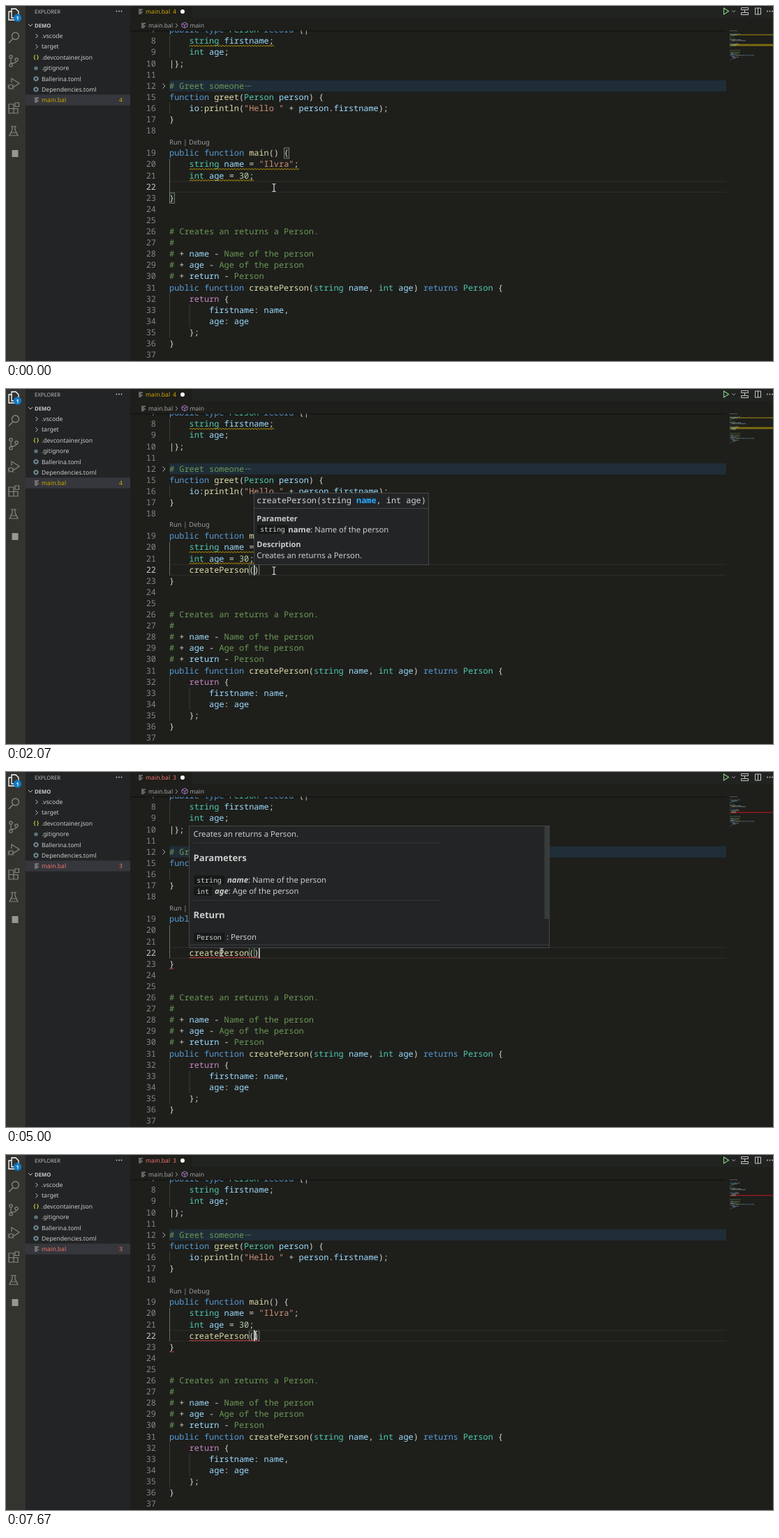
An HTML page that plays this animation: 1099x510 px, repeating every 8 s.

```html
<!DOCTYPE html>
<html lang="en">
<head>
<meta charset="utf-8">
<title>Editor demo</title>
<style>
html, body { margin: 0; width: 100%; height: 100%; overflow: hidden; background: #1e1e1b; }
svg { display: block; }
text { white-space: pre; text-rendering: geometricPrecision; font-family: "Noto Sans", "Open Sans", sans-serif; }
.mono { font-family: "Noto Sans Mono", "DejaVu Sans Mono", monospace; }
.bold { font-weight: 700; }
.ital { font-style: italic; }
.status { fill: #cca700; }
.err .status { fill: #f2736a; }
.on-err, .err .on-warn { display: none; }
.err .on-err { display: inline; }
</style>
</head>
<body>
<svg id="stage" width="1099" height="510" viewBox="0 0 1099 510"></svg>
<script>
(() => {
const CW = 7.14, LH = 16.1, X0 = 234, CODE = 11.9, UI = 11.3, SMALL = 8.65;
const FG = '#d4d4d4', PANEL = '#222425', EDGE = '#454747', HIT = '#2aaaff';
const el = id => document.getElementById(id);
const stage = el('stage');
const col = n => X0 + n * CW;

const text = (x, y, s, fill = '#cccccc', size = UI, cls = '', more = '') =>
  `<text x="${x}" y="${y}" fill="${fill}" font-size="${size}" class="${cls}" ${more}>${s}</text>`;
const mono = (x, y, s, fill = FG, size = CODE, cls = '', more = '') =>
  text(x, y, s, fill, size, 'mono ' + cls, more);
const rect = (x, y, w, h, fill, more = '') =>
  `<rect x="${x}" y="${y}" width="${w}" height="${h}" fill="${fill}" ${more}/>`;
const path = (d, stroke, w = 1) =>
  `<path d="${d}" fill="none" stroke="${stroke}" stroke-width="${w}"/>`;
const ring = (x, y, r, stroke, w = 1.2, more = '') =>
  `<circle cx="${x}" cy="${y}" r="${r}" fill="none" stroke="${stroke}" stroke-width="${w}" ${more}/>`;
const dot = (x, y, r, fill) => `<circle cx="${x}" cy="${y}" r="${r}" fill="${fill}"/>`;
const group = (id, s) => `<g id="${id}">${s}</g>`;
const only = (state, s) => `<g class="on-${state}">${s}</g>`;
const span = (s, fill, cls = '') => `<tspan fill="${fill}" class="${cls}">${s}</tspan>`;

// Code listing; @ marks the code lens row
const source = `public type Person record {|
    string firstname;
    int age;
|};

# Greet someone
function greet(Person person) {
    io:println("Hello " + person.firstname);
}

@
public function main() {
    string name = "Ilvra";
    int age = 30;

}


# Creates an returns a Person.
#
# + name - Name of the person
# + age - Age of the person
# + return - Person
public function createPerson(string name, int age) returns Person {
    return {
        firstname: name,
        age: age
    };
}
`.split('\n');
const rowTop = i => 251.6 + (i - 14) * LH;

const GREEN = '#6a9955', VAR = '#9cdcfe', FUNC = '#dcdcaa';
const colors = ['#ce9178', '#569cd6', '#c586c0', '#4ec9b0', FUNC, '#b5cea8', VAR, FG];
const rule = /(".*?")|\b(public|function|type|record|returns)\b|\b(return)\b|\b(string|int|Person)\b|(\w+)(?=\()|(\d+)|(\w+)|([^\w"]+)/g;

function tokens(s) {
  const doc = s.match(/^(# )(\+ )(\w+)( - )(.*)$/);
  if (doc) return doc.slice(1).map((p, i) => [p, [GREEN, FG, VAR, FG, GREEN][i]]);
  if (s[0] === '#') return [[s, GREEN]];
  return [...s.matchAll(rule)].map(m => [m[0], colors[m.slice(1).findIndex(Boolean)]]);
}

function wave(c, n, row, color) {
  const steps = Math.round(n * CW / 2.1);
  const zigzag = Array.from({ length: steps }, (_, i) => `l2.1 ${i % 2 ? 1.7 : -1.7}`).join('');
  return path(`M${col(c)} ${rowTop(row) + 15.8}${zigzag}`, color, 0.9);
}
const waves = (list, color) => list.map(w => wave(...w, color)).join('');
const guide = (c, r1, r2, color) =>
  path(`M${col(c) + 0.5} ${rowTop(r1)}V${rowTop(r2 + 1)}`, color);

function listing() {
  let out = rect(X0, rowTop(5), 798, LH, '#1f2d37')
    + path('M234 252H1032M234 267.4H1032', '#2d2d2a')
    + guide(0, 1, 2, '#3c3c3a') + guide(0, 7, 7, '#3c3c3a') + guide(0, 12, 14, '#6b6b68')
    + guide(0, 24, 27, '#3c3c3a') + guide(4, 25, 26, '#3c3c3a');
  let num = 7, map = '', my = 39.6;
  source.forEach((s, i) => {
    const y = rowTop(i) + 12;
    if (s === '@') {
      out += text(X0, y - 0.5, 'Run | Debug', '#999999', 9.55, '', 'id="lens"');
      return;
    }
    out += mono(215, y, num, num === 22 ? '#c6c6c6' : '#858585', CODE, '', 'text-anchor="end"');
    const code = s.trimStart(), pad = s.length - code.length, parts = tokens(code);
    if (code) out += mono(col(pad), y, parts.map(p => span(...p)).join(''));
    let c = pad;
    for (const [p, fill] of parts) {
      if (p.trim()) map += rect(1037 + c * 0.52, my, p.trimEnd().length * 0.52, 0.9, fill, 'opacity=".55"');
      c += p.length;
    }
    my += 1.4;
    num += num === 12 ? 3 : 1;
  });
  out += path('M224.5 111.5l3.5 3.5l-3.5 3.5', '#b0b0b0') + [344, 347, 350].map(x => dot(x, 115, 0.8, '#8a8a8a')).join('')
    + only('warn', waves([[4, 17, 1], [4, 22, 12], [4, 13, 13]], '#cca700'))
    + only('err', waves([[4, 14, 14], [0, 1, 15]], '#f14c4c'));
  return out + only('warn', [41, 55, 56.4].map(y => rect(1037, y - 0.3, 62, 1.4, '#83720f')).join(''))
    + only('err', rect(1037, 57.4, 62, 1.3, '#a3191f'))
    + rect(1037, 35.2, 11, 0.9, '#8a9a8a', 'opacity=".55"') + map
    + rect(1039, 57.6, 0, 0.9, FUNC, 'opacity=".55" id="mapTyped"');
}

// Surrounding window
const bars = (x, y) => path(`M${x} ${y - 3}h6M${x} ${y - 1}h4M${x} ${y + 1}h6M${x} ${y + 3}h4`, '#b8b8b8', 0.9);
const dots = (x, y) => [-3.5, 0, 3.5].map(d => dot(x + d, y, 0.9, '#c5c5c5')).join('');
const chevron = (x, y) => path(`M${x} ${y - 3}l3 3l-3 3`, '#c5c5c5');
const gear = y => ring(43, y, 2.4, '#7f9aa5', 1.3) + ring(43, y, 3.6, '#7f9aa5', 1, 'stroke-dasharray="1.4 1.4"');
const cube = (x, y, r, c) =>
  path(`M${x} ${y - r}l${r} ${r / 2}v${r}l${-r} ${r / 2}l${-r} ${-r / 2}v${-r}zM${x - r} ${y - r / 2}l${r} ${r / 2}l${r} ${-r / 2}M${x} ${y}v${r}`, c, 0.9);
const count = (x, y) => only('warn', text(x, y, 4, '', SMALL, 'status')) + only('err', text(x, y, 3, '', SMALL, 'status'));

function sidebar() {
  const g = '#878783', w = 1.2;
  let out = rect(0, 0, 28, 510, '#333330') + rect(28, 0, 150, 510, PANEL)
    + path('M8 4h6l4 4v9h-10zM8 8h-4v12h9v-3', '#ffffff', 1.3)
    + dot(16.5, 17, 5.7, '#0e7ac4') + text(16.5, 19.7, '1', '#fff', 7.2, 'bold', 'text-anchor="middle"')
    + ring(13.5, 43, 5, g, 1.3) + path('M10 47l-6 6', g, 1.4)
    + ring(7, 73, 2.2, g) + ring(7, 85, 2.2, g) + ring(15, 77, 2.2, g) + path('M7 75.5v7M15 79.3q0 3-8 3', g, w)
    + path('M8 110v-6l11 7l-8 5.5', g, w) + ring(7, 116, 3, g)
    + path('M2.5 113l2 1.5M2 116.5h2M2.5 120l2-1.5M11.5 113l-2 1.5M12 116.5h-2M11.5 120l-2-1.5', g, 0.9)
    + path('M4 141h7v13h-7zM4 147.5h13v6.5h-6M13 139h5.5v5.5h-5.5z', g, w)
    + path('M7 173h8M9 173v5l-4 8h12l-4-8v-5M7 182h8', g, w)
    + rect(8.5, 207, 9, 10, '#969692')
    + text(41, 10.5, 'EXPLORER', '#bbbbbb', 7.7) + dots(162, 7.5)
    + path('M32 26l3 3l3-3', '#c5c5c5') + text(41, 30.8, 'DEMO', '#cccccc', 7.7, 'bold')
    + rect(28, 127.3, 150, 15.4, '#36373c');
  const files = ['.vscode', 'target', '.devcontainer.json', '.gitignore', 'Ballerina.toml', 'Dependencies.toml', 'main.bal'];
  files.forEach((f, i) => { out += text(51, 46.1 + i * 15.35, f, '#cccccc', SMALL, i < 6 ? '' : 'status'); });
  return out + chevron(42.5, 43) + chevron(42.5, 58.4) + mono(38.5, 76.4, '{}', '#cbcb41', 8, 'bold')
    + dot(43, 89.5, 2.8, '#5d7079') + gear(104.5) + gear(119.8) + bars(41, 135) + count(162, 138.2);
}

const header = () => rect(178, 0, 921, 35, '#1e1e1b') + rect(267, 0, 832, 17.5, '#212321')
  + rect(178, 35, 854, 1.6, '#000', 'opacity=".35"')
  + bars(190, 8) + text(200, 11, 'main.bal', '', SMALL, 'status') + count(239, 11) + dot(253, 8, 3, '#fff')
  + bars(194, 28) + text(204, 31, 'main.bal', '#a5a5a5', SMALL) + path('M243 25l2.8 3l-2.8 3', '#a0a0a0')
  + cube(256, 27.5, 4, '#b180d7') + text(263.5, 31, 'main', '#a5a5a5', SMALL)
  + path('M1028.5 3l7 4.5l-7 4.5z', '#89d185', 1.1) + path('M1040.5 6.5l2.2 2.2l2.2-2.2', '#c5c5c5', 0.9)
  + path('M1053.5 2.5h10v3h-10zM1053.5 9.5h10v3h-10zM1058.5 5.5v4', '#c5c5c5')
  + path('M1073.5 3h8v9h-8zM1077.5 3v9', '#c5c5c5') + dots(1094.5, 7.5);

// Pop-ups
const items = ['createPerson(string name, int age)', 'check', 'checkpanic', 'client', 'ballerina/cache', 'ballerina/cloud', 'ballerina/crypto'];

function suggest(typed) {
  const n = typed.length, x = col(4 + n) + 0.3, y = 268;
  const list = items.filter(s => s.split('/').pop().startsWith(typed));
  let out = rect(x - 2, y, 493, list.length * LH + 5, '#000', 'opacity=".22" rx="2"')
    + rect(x, y, 489, list.length * LH + 2, PANEL, `stroke="${EDGE}"`) + rect(x + 0.5, y + 0.5, 488, LH, '#0d456d');
  list.forEach((s, i) => {
    const base = y + i * LH + 12.2, cy = base - 4, k = s.indexOf('/') + 1;
    out += mono(x + 15.8, base, s.slice(0, k) + span(s.slice(k, k + n), HIT, 'bold') + s.slice(k + n), i ? FG : '#ffffff');
    if (k) out += mono(x + 2, base - 1, '{}', '#c5c5c5', 8.6);
    else if (i) out += path(`M${x + 2.5} ${cy - 3}h4m1.5 0h3M${x + 2.5} ${cy}h6m1.5 0h1.5M${x + 2.5} ${cy + 3}h2.5m1.5 0h5`, '#c5c5c5', 1.2);
    else out += cube(x + 7, cy, 3.8, '#ffffff') + mono(x + 482, base - 0.3, 'Person', '#d8dde2', 10.2, '', 'text-anchor="end"');
  });
  return out;
}

const chip = (x, y, s) => rect(x, y - 10.2, s.length * 5.95 + 8.5, 13, '#171919', 'rx="2"') + mono(x + 4.2, y, s, FG, 9.9);

const hint = () => rect(355.5, 149.5, 250, 103, PANEL, `stroke="${EDGE}"`)
  + mono(359.3, 164.2, 'createPerson(string ' + span('name', HIT, 'bold') + ', int age)') + path('M356 171.5H605', EDGE)
  + text(359.3, 189.8, 'Parameter', '#cccccc', 11, 'bold') + chip(360, 205.4, 'string')
  + text(404.3, 205.6, span('name', '#cccccc', 'bold') + ': Name of the person')
  + text(359.3, 226.8, 'Description', '#cccccc', 11, 'bold') + text(359.3, 243.2, 'Creates an returns a Person.');

function problem(y, who) {
  const s = `missing required parameter '${who}' in call to 'createPerson()'`;
  return mono(268.3, y, s, '#cccccc') + mono(268.3 + s.length * CW + 4.6, y, '(BCE2063)', '#8c8c8c');
}
const param = (y, type, name, x, rest) => chip(269, y, type) + text(x, y, span(name, '#cccccc', 'bold ital') + rest);

const docs = () => text(268.5, 92.7, 'Creates an returns a Person.')
  + path('M268 101.8H623M268 184.3H623', '#343737') + path('M262 248.5H779M262 270.3H779', '#3a3d3d')
  + text(268.5, 127.8, 'Parameters', '#cccccc', 13.1, 'bold')
  + param(158.6, 'string', 'name', 317, ': Name of the person')
  + param(174.9, 'int', 'age', 299, ': Age of the person')
  + text(268.5, 210.4, 'Return', '#cccccc', 13.1, 'bold')
  + chip(269, 241.4, 'Person') + text(316, 241.4, ': Person')
  + problem(263.2, 'age') + problem(284.9, 'name')
  + rect(262, 292.3, 517, 17, '#2b2d2d')
  + text(268.3, 303, 'View Problem', '#3794ff', SMALL) + text(333, 303, 'No quick fixes available', '#cccccc', SMALL);

const box = (c, row) => rect(col(c) + 0.4, rowTop(row) + 0.6, 7, 15, '#1d261b', 'stroke="#858585" stroke-width=".9"');

stage.innerHTML = rect(0, 0, 1099, 510, '#1e1e1b')
  + group('braces', box(23, 11) + box(0, 15)) + group('parens', box(16, 14) + box(17, 14))
  + listing() + mono(col(4), 263.6, '', FG, CODE, '', 'id="typed"')
  + rect(0, 251.6, 1.4, LH, '#d8d8d4', 'id="caret"')
  + sidebar() + header()
  + group('suggest', '') + group('hint', hint())
  + group('hover', rect(262.5, 77.5, 516, 175, PANEL, `stroke="${EDGE}" id="hoverBox"`)
    + `<svg id="hoverView" x="263" width="515">${docs()}</svg>` + rect(771.5, 79, 7, 133, '#414444', 'id="slider"'))
  + group('beam', path('M-2.5-5.5q2.5 0 2.5 1.5q0-1.5 2.5-1.5M-2.5 5.5q2.5 0 2.5-1.5q0 1.5 2.5 1.5M0-4v8', '#e4e4e4', 1.1))
  + group('arrow', '<path d="M0 0v9l2.1-1.9l1.5 3.3l1.5-.7l-1.5-3.2h2.8z" fill="#111" stroke="#eee" stroke-width=".8"/>');

// Timelines: each entry holds from its time until the next
const CALL = 'createPerson()';
const typing = [[0, ''], [600, 'c'], [930, 'cr'], [1130, 'cre'], [1270, 'crea'], [1400, 'creat'], [1930, CALL]];
const blink = [[0, 0], [270, 1], [2600, 0], [3070, 1], [3600, 0], [3930, 1], [4430, 0], [4930, 1],
  [5470, 0], [5970, 1], [6470, 0], [7000, 1], [7470, 0], [7600, 1]];
const mouse = [[0, 384, 261], [4130, 384.4, 261.4], [4330, 379, 269], [4400, 364, 280], [4470, 340, 278], [4530, 315, 268],
  [4670, 311, 271], [4730, 310, 265], [4800, 309, 259], [5670, 311, 246, 1], [5730, 312, 239, 1],
  [6400, 312, 228, 1], [6470, 317, 213, 1], [6530, 325, 222, 1], [6600, 323, 235, 1],
  [7000, 328, 239, 1], [7070, 338, 246, 1], [7130, 350, 256], [7200, 356, 259], [7470, 357, 260], [7670, 357.5, 259]];
const fade = [[0, 0], [4870, 0.35], [4930, 0.75], [5000, 1], [7600, 0]];
const scrolling = [[0, 0], [5870, 28], [6000, 54.8]];
const at = (list, t) => list.filter(e => e[0] <= t).pop();
const show = (id, on) => { el(id).style.display = on ? '' : 'none'; };
const set = (id, attrs) => { for (const k in attrs) el(id).setAttribute(k, attrs[k]); };

let shown = null;
function draw(t) {
  const typed = at(typing, t)[1], done = typed === CALL;
  if (typed !== shown) {
    shown = typed;
    el('typed').innerHTML = done ? span('createPerson', FUNC) + '()'
      : typed && span(typed, FG) + span(CALL.slice(typed.length), '#686866', 'ital');
    el('suggest').innerHTML = typed && !done ? suggest(typed) : '';
    set('mapTyped', { width: typed.length * 0.52 });
  }
  show('suggest', t >= 670);
  show('braces', !done);
  show('parens', done);
  show('hint', t >= 2070 && t < 3930);
  stage.classList.toggle('err', t >= 3070);
  set('lens', { y: rowTop(10) + (t >= 600 && t < 2600 ? 11 : 11.5) });

  const pos = !done ? typed.length : t >= 3930 && t < 7600 ? 14 : 13;
  set('caret', { x: col(4 + pos) - 0.3 });
  show('caret', at(blink, t)[1]);

  const short = t >= 7330, y = short ? 193.5 : 77.5, h = 252.5 - y, s = at(scrolling, t)[1];
  el('hover').style.opacity = at(fade, t)[1];
  set('hoverBox', { y, height: h });
  set('hoverView', { y: y + 0.5, height: h - 0.5, viewBox: `263 ${y + 0.5 + s} 515 ${h - 0.5}` });
  set('slider', { y: 78 + s * 0.765, fill: t >= 5670 ? '#4a4d4d' : '#383b3b' });
  show('slider', !short);

  const [, mx, my, arrow] = at(mouse, t);
  show('beam', !arrow);
  show('arrow', arrow);
  set(arrow ? 'arrow' : 'beam', { transform: `translate(${mx} ${my})` });
}

const start = performance.now();
function tick() {
  draw((performance.now() - start) % 8000);
  requestAnimationFrame(tick);
}
tick();
})();
</script>
</body>
</html>
```
